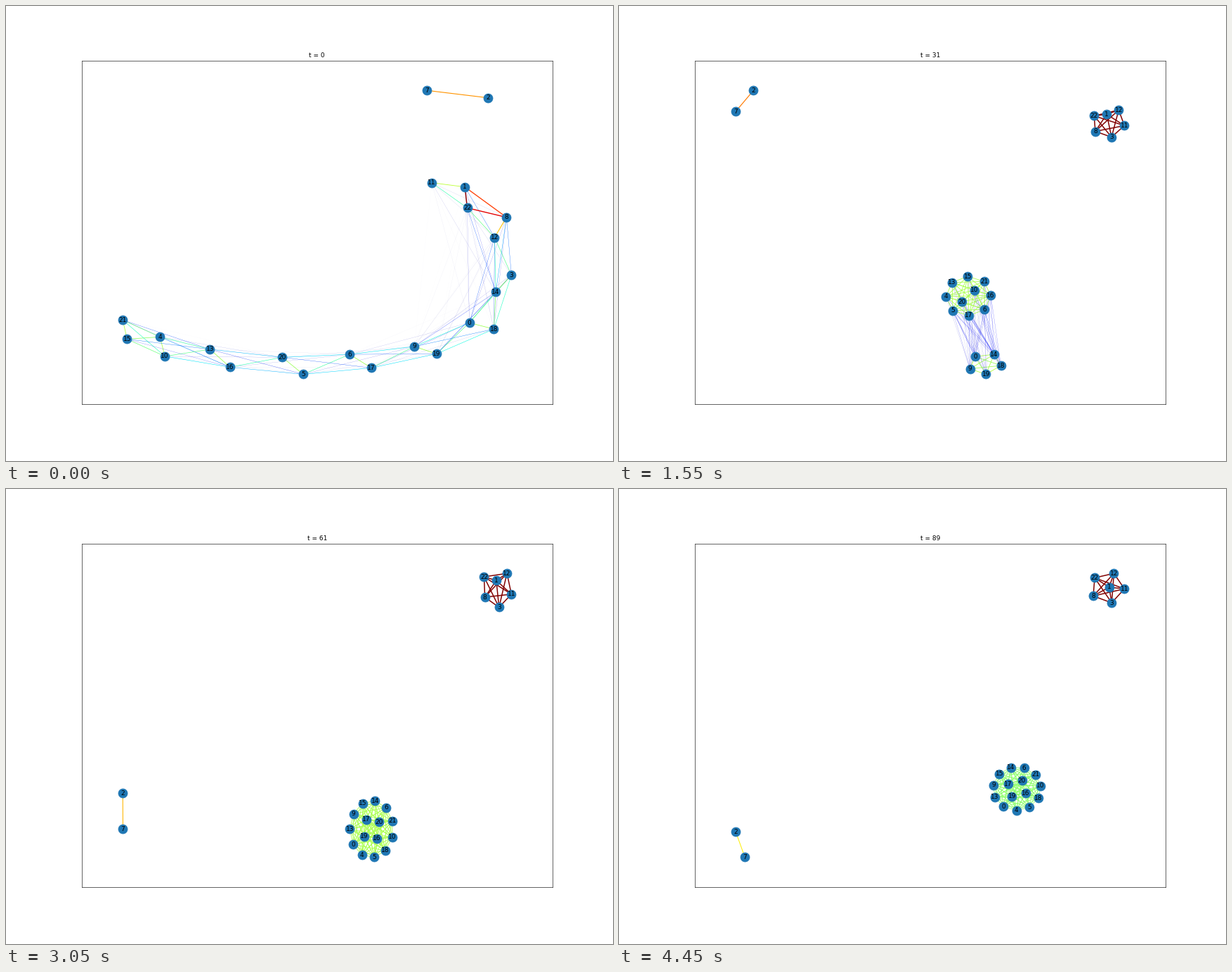
Animation of 864 by 648 pixels, one loop 4500 ms. Source, as a matplotlib script:

```python
import numpy as np
import matplotlib.pyplot as plt
from matplotlib.animation import FuncAnimation
from matplotlib.collections import LineCollection

FRAMES, INTERVAL = 90, 50
N = 23
FAR = np.inf
LOW, HIGH = np.array([166.2, 120.2]), np.array([719.4, 524.5])
ROWS, COLS = np.triu_indices(N, 1)

CHAIN = [21, 15, 4, 10, 13, 16, 20, 5, 6, 17, 9, 19, 0, 18, 14, 3, 12, 8, 22, 1, 11]
PAIR = [2, 7]
CORE = [1, 8, 22]
RED = [12, 11, 3, 8, 22, 1]
MAIN = [15, 21, 16, 6, 17, 5, 4, 13, 10, 20]
OUTER = [0, 14, 18, 19, 9]
MERGED = [14, 6, 21, 10, 18, 5, 4, 0, 13, 9, 15, 20, 16, 19, 17]


def ring(nodes, centre, radii, start, inner=0):
    """Nodes clockwise on an ellipse, the last `inner` ones inside it."""
    rim = len(nodes) - inner
    places = {}
    for i, node in enumerate(nodes):
        if i < rim:
            angle, scale = start + 360 * i / rim, 1
        else:
            angle = start + 45 + 360 * (i - rim) / inner
            scale = .42 if inner > 1 else .1
        a = np.radians(angle)
        places[node] = np.array(centre) + scale * np.array(radii) * [np.cos(a), np.sin(a)]
    return places


def chain(nodes, knots, sway=11, pinch=.6):
    """Nodes in pairs along a path, alternating between its two sides."""
    knots = np.array(knots, float)
    marks = np.linspace(0, len(nodes) - 1, len(knots))

    def path(s):
        return np.array([np.interp(s, marks, column) for column in knots.T])

    places = {}
    for i, node in enumerate(nodes):
        s = i - i % 2 + .5 + (i % 2 - .5) * pinch
        dx, dy = path(s + .8) - path(s - .8)
        side = 1 - 2 * (i % 2)
        places[node] = path(s) + side * sway * np.array([dy, -dx]) / np.hypot(dx, dy)
    return places


def fit(xy):
    low, high = xy.min(axis=0), xy.max(axis=0)
    return LOW + (xy - low) / (high - low) * (HIGH - LOW)


def state(t, links, *parts):
    """A layout and its edge strengths; links are (group, group, amplitude, reach)."""
    places = {node: p for part in parts for node, p in part.items()}
    xy = fit(np.array([places[i] for i in range(N)], float))
    dist = np.linalg.norm(xy[:, None] - xy[None], axis=2)
    w = np.zeros((N, N))
    for a, b, amp, reach in links:
        part = amp * np.exp(-(dist[np.ix_(a, b)] / reach) ** 2.5)
        w[np.ix_(a, b)] = part
        w[np.ix_(b, a)] = part.T
    return t, xy, w[ROWS, COLS]


def merged_links(green, orange):
    return [(MERGED, MERGED, green, FAR), (RED, RED, 1, FAR), (PAIR, PAIR, orange, FAR)]


states = [
    state(0, [(CHAIN, CHAIN, .57, 125), (RED, RED, .8, 75), (CORE, CORE, 1, 150),
              (PAIR, PAIR, .75, FAR)],
          chain(CHAIN, [(170, 453), (255, 493), (421, 512), (575, 497),
                        (703, 440), (700, 308), (610, 242)]),
          {7: (596.5, 120), 2: (680.5, 130.5)}),
    state(13, [(MAIN, MAIN, .6, 95), (OUTER, OUTER, .59, FAR), (MAIN, OUTER, .1, 200),
               (RED, RED, .99, FAR), (PAIR, PAIR, .81, FAR)],
          chain(CHAIN[:10], [(358, 470), (560, 492)]),
          ring(OUTER, (676, 506), (35, 18), -75),
          ring(RED, (688, 219), (32, 19), -45, inner=1),
          {7: (166, 140.5), 2: (206, 120)}),
    state(23, [(MAIN, MAIN, .54, FAR), (OUTER, OUTER, .6, FAR), (MAIN, OUTER, .035, FAR),
               (RED, RED, 1, FAR), (PAIR, PAIR, .8, FAR)],
          ring(MAIN, (493, 400), (31, 26), -95, inner=2),
          ring(OUTER, (533, 511), (28, 14), -90),
          ring(RED, (696, 222), (24, 18), -57, inner=1),
          {7: (166, 140), 2: (196, 120)}),
    state(39, [(MAIN, MAIN, .57, FAR), (OUTER, OUTER, .55, 120), (MAIN, OUTER, .3, 90),
               (RED, RED, 1, FAR), (PAIR, PAIR, .76, FAR)],
          ring(MAIN, (502, 431), (33, 27), -88, inner=2),
          ring(OUTER, (510, 503), (30, 21), -164),
          ring(RED, (698, 142), (23, 23), -50),
          {7: (166, 194), 2: (186.5, 157.5)}),
    state(52, merged_links(.57, .74),
          ring(MERGED, (501, 482), (30, 43), -90, inner=4),
          ring(RED, (701, 149), (20, 30), -48, inner=1),
          {7: (166, 430), 2: (171.5, 376.5)}),
    state(70, merged_links(.54, .69),
          ring(MERGED, (542, 472), (32, 36), -72, inner=4),
          ring(RED, (698, 143), (23, 24), -50),
          {7: (172, 524.5), 2: (166, 479.5)}),
    state(89, merged_links(.52, .66),
          ring(MERGED, (566, 427), (34, 31), -105, inner=4),
          ring(RED, (695, 142), (24, 22), -68, inner=1),
          {7: (179, 524.5), 2: (166, 488.5)}),
]


def spread_apart(xy, gap):
    for _ in range(25):
        delta = xy[:, None] - xy[None]
        dist = np.linalg.norm(delta, axis=2) + 1e-6
        push = np.clip(gap - dist, 0, None)
        np.fill_diagonal(push, 0)
        xy = xy + .2 * (delta / dist[..., None] * push[..., None]).sum(axis=1)
    return xy


def layout(t):
    k = max(i for i, s in enumerate(states[:-1]) if s[0] <= t)
    (t0, xy0, w0), (t1, xy1, w1) = states[k:k + 2]
    u = (t - t0) / (t1 - t0)
    xy = spread_apart((1 - u) * xy0 + u * xy1, 18 * min(1, 8 * u * (1 - u)))
    return fit(xy), (1 - u) * w0 + u * w1


plt.rcParams["font.family"] = "DejaVu Sans"
fig = plt.figure(figsize=(16, 12), dpi=54, facecolor="white")
ax = fig.add_axes([.125, .125, .775, .755])
ax.set(xlim=(108, 777.6), ylim=(567, 77.76), xticks=[], yticks=[])
title = ax.set_title("t = 0", fontsize=12)
edges = ax.add_collection(LineCollection([], zorder=1), autolim=False)
nodes = ax.scatter(*states[0][1].T, s=300, c="#1f77b4", linewidths=1, zorder=2)
labels = [ax.text(0, 0, str(i), fontsize=12, ha="center", va="center", zorder=3)
          for i in range(N)]


def draw(t):
    xy, w = layout(t)
    seen = w > .003
    edges.set_segments(np.stack([xy[ROWS], xy[COLS]], axis=1)[seen])
    edges.set_color(plt.cm.jet(w[seen]))
    edges.set_linewidth(2 * w[seen])
    nodes.set_offsets(xy)
    for label, point in zip(labels, xy):
        label.set_position(point)
    title.set_text(f"t = {t}")
    return [edges, nodes, title, *labels]


anim = FuncAnimation(fig, draw, frames=FRAMES, interval=INTERVAL, repeat=True)
plt.show()
```
